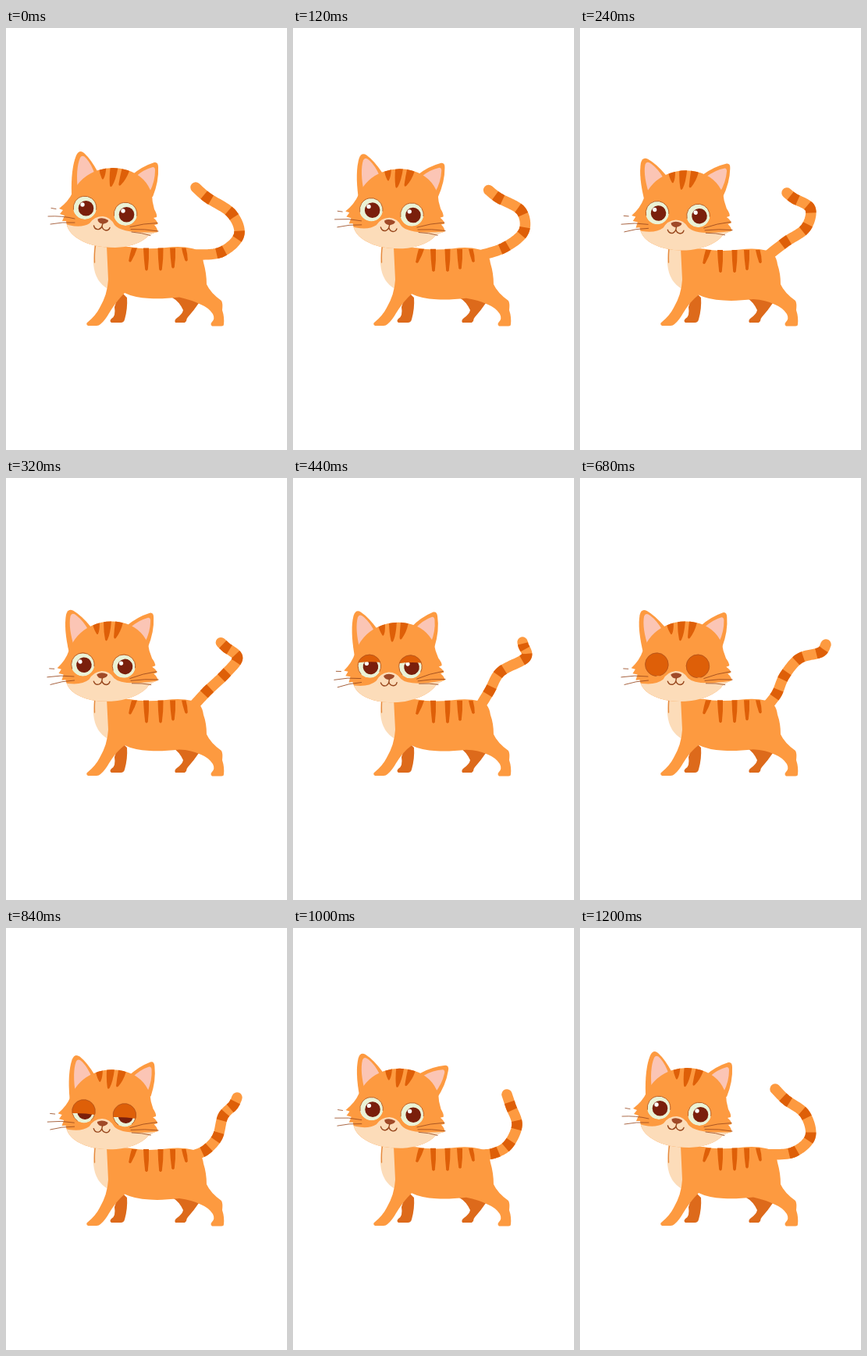
Write an HTML page with a canvas that moves like this. It is 360x540 px and loops after 1240 ms.

```html
<!DOCTYPE html>
<html lang="en">
<head>
<meta charset="utf-8">
<title>Cat</title>
<style>
html, body { margin: 0; width: 100%; height: 100%; overflow: hidden; background: #fff; }
canvas { display: block; width: 360px; height: 540px; }
</style>
</head>
<body>
<canvas id="stage"></canvas>
<script>
const LOOP = 1240, STEP = 40;
const FUR = '#fd9a40', STRIPE = '#de5f08', FAR = '#dd6a1b', CREAM = '#fcdcb9',
  PINK = '#fbc5b5', WHITE = '#eaf2d6', IRIS = '#7a1f0c', LINE = '#97461c';

const canvas = document.getElementById('stage');
const dpr = window.devicePixelRatio || 1;
canvas.width = 360 * dpr;
canvas.height = 540 * dpr;
const ctx = canvas.getContext('2d');

const times = [0, 240, 440, 600, 680, 840, 1000, 1200];
// head angle, left ear, right ear, lid, body drop
const pose = [
  [0, 0, 0, 0, 0],
  [-4.7, -8, 9, 0, 2.6],
  [-8, 0, 3, 0.36, 3.2],
  [-7, -4, 4, 1, 3],
  [-6.4, -6, 5, 1, 2.8],
  [-3.3, 0, 0, 0.62, 1.6],
  [-1, -8, 13, 0, 0.3],
  [0, 0, 0, 0, 0]
];
// four band centres along the tail, then its tip
const tail = [
  [275, 287, 298.5, 265, 289, 237.5, 258, 217, 243, 204],
  [263, 274, 289, 256, 295, 231, 274, 218, 265, 211],
  [252, 272, 266, 248, 298, 230, 295, 214, 294, 210],
  [252, 277, 264, 255, 287, 235, 312, 225, 323, 217],
  [252, 276, 262, 253, 281, 231, 308, 223, 315, 213],
  [256, 284, 271, 267, 278, 241, 291, 227, 296, 217],
  [258, 288, 276, 277, 287, 252, 279, 228, 274, 213],
  [273, 287, 295, 267, 288, 238, 264, 220, 250, 206]
];

// Periodic cubic interpolation that flattens at turning points.
function sample(table, t) {
  const n = times.length;
  const at = i => times[(i + n) % n] + LOOP * Math.floor(i / n);
  const row = i => table[(i + n) % n];
  let i = n - 1;
  while (times[i] > t) i--;
  const span = at(i + 1) - at(i), u = (t - at(i)) / span;
  return row(i).map((a, k) => {
    const rate = j => (row(j + 1)[k] - row(j)[k]) / (at(j + 1) - at(j));
    const slope = j => {
      const p = rate(j - 1), q = rate(j);
      return p * q <= 0 ? 0 : 2 * p * q / (p + q);
    };
    const b = row(i + 1)[k], v = 1 - u;
    return a * v * v * (1 + 2 * u) + b * u * u * (3 - 2 * u)
      + span * u * v * (slope(i) * v - slope(i + 1) * u);
  });
}

const fill = (d, color) => { ctx.fillStyle = color; ctx.fill(new Path2D(d)); };
const stroke = (d, color, w) => {
  ctx.strokeStyle = color;
  ctx.lineWidth = w;
  ctx.stroke(new Path2D(d));
};
const disc = (x, y, r, color) => {
  ctx.fillStyle = color;
  ctx.beginPath();
  ctx.arc(x, y, r, 0, 7);
  ctx.fill();
};
function turned(x, y, deg, draw) {
  ctx.save();
  ctx.translate(x, y);
  ctx.rotate(deg * Math.PI / 180);
  ctx.translate(-x, -y);
  draw();
  ctx.restore();
}

function drawTail(row, drop) {
  const p = [[239, 290 + drop]];
  for (let i = 0; i < row.length; i += 2) p.push([row[i], row[i + 1]]);
  const last = p.length - 1, path = new Path2D(), bands = [];
  let length = 0, prev = p[0];
  path.moveTo(...prev);
  for (let i = 0; i < last; i++) {
    const a = p[Math.max(i - 1, 0)], b = p[i], c = p[i + 1], d = p[Math.min(i + 2, last)];
    for (let s = 1; s <= 12; s++) {
      const u = s / 12;
      const q = [0, 1].map(k => b[k] + u / 2 * (c[k] - a[k]
        + u * (2 * a[k] - 5 * b[k] + 4 * c[k] - d[k] + u * (3 * (b[k] - c[k]) + d[k] - a[k]))));
      length += Math.hypot(q[0] - prev[0], q[1] - prev[1]);
      path.lineTo(...q);
      prev = q;
    }
    if (i < last - 1) bands.push(length);
  }
  ctx.lineWidth = 13.5;
  ctx.lineCap = ctx.lineJoin = 'round';
  ctx.strokeStyle = FUR;
  ctx.stroke(path);
  const dash = [0];
  let pos = 0;
  for (const b of bands) {
    const from = Math.max(b - 5.5, pos), to = Math.min(b + 5.5, length - 2);
    dash.push(from - pos, to - from);
    pos = to;
  }
  dash.push(999);
  ctx.lineCap = 'butt';
  ctx.strokeStyle = STRIPE;
  ctx.setLineDash(dash);
  ctx.stroke(path);
  ctx.setLineDash([]);
  ctx.lineCap = 'round';
}

function drawBody(b) {
  const y = v => v + b;
  fill('M146 336L155 345Q156 359 152 373Q151 377 147 377L135 377Q132 375 135 372Q141 369 139 357Z', FAR);
  fill('M213 342L240 344L247 352Q241 361 233 370Q231 372 231 375L229 377L217 377Q215 374 219 371Q226 366 227 361Q222 350 213 345Z', FAR);
  fill(`M113 276L112 302Q114 325 131 334L140 300L140 276Z`, CREAM);
  stroke('M114.5 279Q113 288 113.5 300', '#e58a3f', 1.4);
  fill(`M129 ${y(279)}L158 ${y(280)}Q178 ${y(284)} 205 ${y(281)}Q224 ${y(278.5)} 238 ${y(282)}
    Q251 ${y(284)} 253 ${y(300)}Q257 314 257 328Q262 339 276 349Q278 352 277 361
    Q280 370 279 379Q279 381.5 276 381.5L264 381.5Q261 379 264 376Q268 372 265 366
    Q260 358 250 354Q238 348 222 ${y(344.5)}Q200 ${y(347)} 184 ${y(346)}Q164 ${y(345)} 152 ${y(339)}
    Q141 350 132 365Q127 374 121 379Q119 381 116 381L105 381Q102 379 104 377
    Q115 368 120 358Q130 341 131 322Z`, FUR);
  const marks = [[161, 168, 159, 299], [176, 183, 180, 310], [194.5, 201.5, 198, 310],
    [210, 217, 214, 307], [225, 230.5, 231, 298]];
  for (const [l, r, x, end] of marks) {
    const top = y(281.5), e = y(end - 1), m = (top + e) / 2;
    fill(`M${l} ${top}L${r} ${top}Q${(r + x) / 2 + 2} ${m} ${x + 1.8} ${e}
      Q${x} ${e + 3} ${x - 1.8} ${e}Q${(l + x) / 2 - 1.5} ${m} ${l} ${top}Z`, STRIPE);
  }
}

function drawEye(x, y, lid) {
  ctx.save();
  ctx.beginPath();
  ctx.arc(x, y, 15, 0, 7);
  ctx.clip();
  disc(x, y, 15, WHITE);
  disc(x + 1.5, y + 0.8, 9.8, IRIS);
  disc(x - 3, y - 4, 2.7, '#fff');
  if (lid > 0.01) turned(x, y, 7, () => {
    const edge = y - 16 + 32 * lid;
    fill(`M${x - 17} ${y - 18}H${x + 17}V${edge}Q${x} ${edge - 2} ${x - 17} ${edge}Z`, STRIPE);
  });
  ctx.restore();
  ctx.strokeStyle = '#b8561a';
  ctx.lineWidth = 0.9;
  ctx.beginPath();
  ctx.arc(x, y, 14.8, Math.PI * (0.95 - lid * 0.4), Math.PI * (2.05 + lid * 0.4));
  ctx.stroke();
}

const skull = 'M118 182Q137 176 156 182Q180 190 187 213Q187 222 190 232Q194 239 193 242L189 243'
  + 'Q194 247 194.5 251L190 252Q194 256 194.5 261Q184 263 179 269Q165 280 140 281'
  + 'Q110 281 93 270Q78 261 77 247L72 247L75 240L69 238L73 233L68 231Q80 222 85 211Q96 189 118 182Z';

function drawHead(angle, left, right, lid) {
  turned(177, 258, angle, () => {
    turned(102, 198, left, () => {
      fill('M84 213Q83 180 90 163Q94 155 100 160Q109 168 118 185L104 212Z', FUR);
      fill('M92 208Q89 180 95 166Q98 161 103 167Q110 175 114 188L104 206Z', PINK);
    });
    turned(175, 203, right, () => {
      fill('M160 189Q174 177 190 172Q195 171 195 178Q196 196 188 216L170 212Z', FUR);
      fill('M165 191Q176 181 188 178Q191 178 191 182Q191 196 184 210L172 208Z', PINK);
    });
    fill(skull, FUR);
    ctx.save();
    ctx.clip(new Path2D(skull));
    fill('M70 249Q94 258 107 250Q113 241 124 241Q134 242 139 252Q149 264 198 261V290H70Z', CREAM);
    fill('M119 176H128.5Q128 188 125 193Q123.5 195 122.5 192Q119.5 186 119 176Z', STRIPE);
    fill('M134 176H144Q141 194 136 202Q133.5 205 133 201Q132 190 134 176Z', STRIPE);
    fill('M149 178L158 183Q154 194 147 201Q144 203 144.5 199Q146 190 149 178Z', STRIPE);
    ctx.restore();
    drawEye(101, 230, lid);
    drawEye(153, 238, lid);
    fill('M117.5 244.5Q124 241.5 131 246Q131.500 248.500 127 250Q123 251.500 119.500 249Q117 246.500 117.500 244.500Z', '#a04a28');
    stroke('M124 250L123 253.500M112.500 253Q114 258.500 119 257.500Q122 256.500 123 253.500Q123.500 258 128 259Q132 259 133 255.500', LINE, 1.4);
    stroke('M58 230.500L64 231.500M54 241Q72 240 88 244M57 251Q72 248 88 249', LINE, 0.8);
    stroke('M159 254.500Q176 250 194 249.500M160 257.500Q178 257 195 260M161 261Q174 262 185 265.500', LINE, 0.8);
  });
}

function render(ms) {
  let t = Math.floor(ms % LOOP / STEP) * STEP;
  if (t === 40 || t === 1040) t -= STEP; // these two poses hold for a double step
  const [angle, left, right, lid, drop] = sample(pose, t);
  ctx.setTransform(dpr, 0, 0, dpr, 0, 0);
  ctx.fillStyle = '#fff';
  ctx.fillRect(0, 0, 360, 540);
  drawTail(sample(tail, t), drop);
  drawBody(drop);
  drawHead(angle, left, right, lid);
}

const start = performance.now();
function tick() {
  render(performance.now() - start);
  requestAnimationFrame(tick);
}
tick();
</script>
</body>
</html>
```
